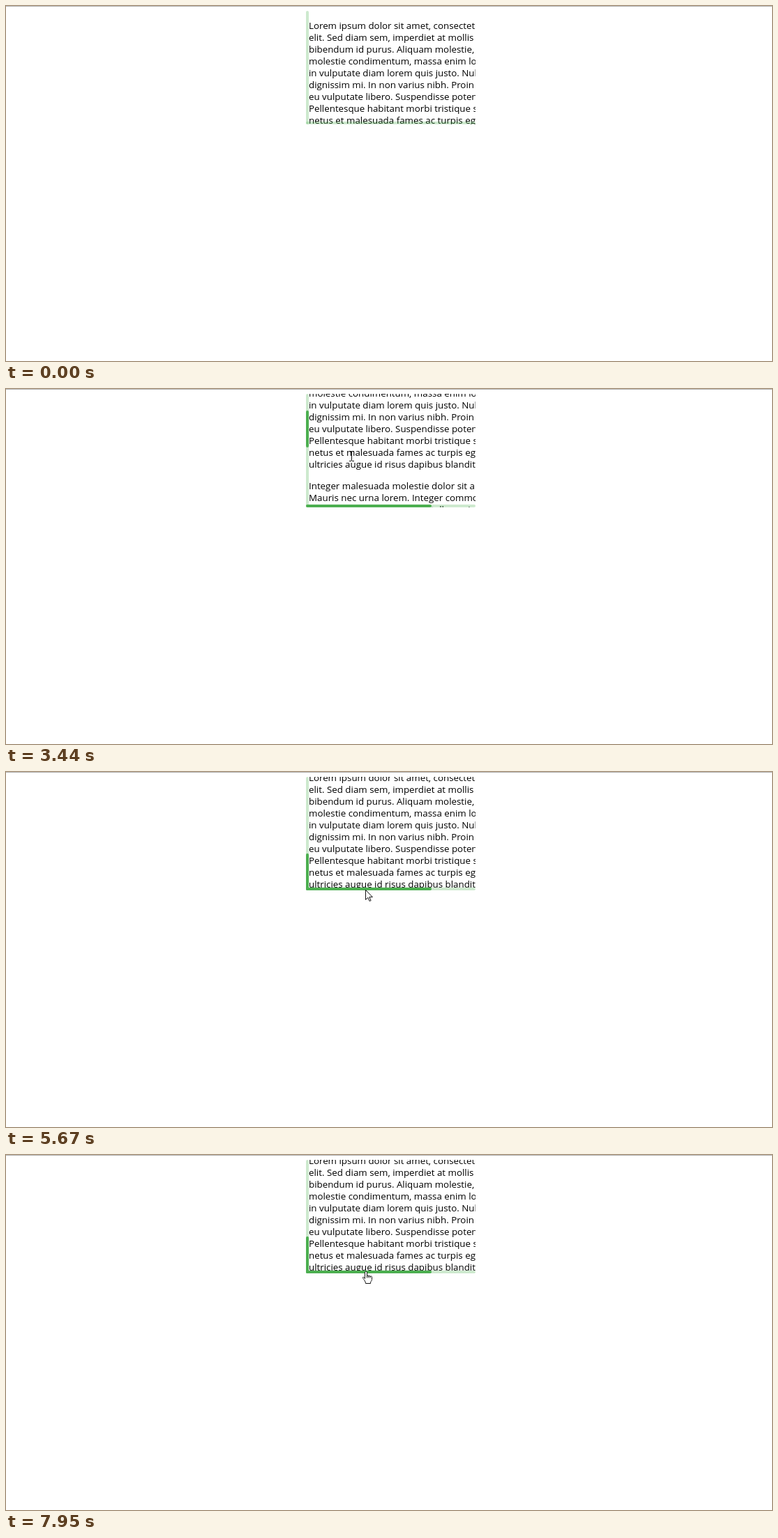
These frames come from a looping animation (1098x510 px, 8000 ms). An HTML page:

```html
<!DOCTYPE html>
<html lang="la">
<head>
<meta charset="utf-8">
<title>Scroll box</title>
<style>
@property --x { syntax: "<integer>"; inherits: true; initial-value: 0; }
@property --y { syntax: "<integer>"; inherits: true; initial-value: 0; }
@property --cx { syntax: "<integer>"; inherits: true; initial-value: 995; }
@property --cy { syntax: "<integer>"; inherits: true; initial-value: 527; }

html, body { margin: 0; width: 100%; height: 100%; overflow: hidden; background: #fff; }
.stage {
  position: relative; width: 1098px; height: 510px; overflow: hidden;
  box-sizing: border-box; border-top: 1px solid #b4b4b4;
  cursor: default;
}
.box {
  position: absolute; left: 430px; top: 6px; width: 243px; height: 163px; overflow: hidden;
  animation: scroll-y 8s infinite, scroll-x 8s infinite;
}
.text {
  position: absolute;
  left: calc(4px - var(--x) * 1px);
  top: calc(var(--y) * -1px);
  font: 13.333px/17px "Open Sans", "Noto Sans", sans-serif;
  color: #000; white-space: nowrap;
}
.text p { margin: 13.333px 0; }

.bar { position: absolute; left: 0; bottom: 0; border-radius: 2px; background: rgba(76, 175, 80, .28); }
.bar.v { width: 4px; height: 163px; }
.bar.h { width: 243px; height: 4px; }
.thumb {
  position: absolute; left: 0; top: 0; border-radius: 2px; background: #4caf50;
  animation: fade 8s linear infinite;
}
.v .thumb { width: 4px; height: 53px; transform: translateY(calc(var(--y) * 110px / 336)); }
.h .thumb { width: 180px; height: 4px; transform: translateX(calc(var(--x) * 63px / 85)); }

.mouse {
  position: absolute; left: 0; top: -1px;
  transform: translate(calc(var(--cx) * 1px), calc(var(--cy) * 1px));
  animation: mouse 8s infinite;
}
.mouse svg { position: absolute; overflow: visible; width: 20px; height: 20px; }
.mouse path { fill: #fff; stroke: #111; stroke-width: 1; stroke-linejoin: round; }
.mouse .thin { fill: none; }
.arrow { left: 0; top: 0; animation: arrow 8s step-end infinite; }
.beam { left: -3px; top: -8px; animation: beam 8s step-end infinite; }
.hand { left: -5px; top: 0; animation: hand 8s step-end infinite; }

/* jump-both: the first change falls on the start of a move, the last on its end */
@keyframes mouse {
  0% { --cx: 995; --cy: 527; animation-timing-function: step-end; }
  .875% { --cx: 995; --cy: 527; animation-timing-function: steps(11, jump-both); }
  10.5% { --cx: 455; --cy: 47; animation-timing-function: step-end; }
  19% { --cx: 455; --cy: 47; animation-timing-function: steps(2, jump-both); }
  21% { --cx: 442; --cy: 43; animation-timing-function: step-end; }
  24% { --cx: 442; --cy: 43; animation-timing-function: steps(8, jump-both); }
  32% { --cx: 489; --cy: 80; animation-timing-function: step-end; }
  35.875% { --cx: 489; --cy: 80; animation-timing-function: steps(3, jump-both); }
  39% { --cx: 495; --cy: 97; animation-timing-function: step-end; }
  49.625% { --cx: 495; --cy: 97; animation-timing-function: steps(5, jump-both); }
  56.375% { --cx: 495; --cy: 106; animation-timing-function: step-end; }
  58.25% { --cx: 495; --cy: 107; animation-timing-function: step-end; }
  60% { --cx: 495; --cy: 107; animation-timing-function: steps(3, jump-both); }
  62.875% { --cx: 511; --cy: 145; animation-timing-function: step-end; }
  65.125% { --cx: 511; --cy: 145; animation-timing-function: steps(6, jump-both); }
  70.875% { --cx: 515; --cy: 169; animation-timing-function: step-end; }
  75.875% { --cx: 515; --cy: 169; animation-timing-function: steps(2, jump-both); }
  78% { --cx: 517; --cy: 167; animation-timing-function: step-end; }
  80.75% { --cx: 517; --cy: 167; animation-timing-function: steps(4, jump-both); }
  84.75% { --cx: 521; --cy: 166; animation-timing-function: steps(5, end); }
  89.625% { --cx: 560; --cy: 167; animation-timing-function: step-end; }
  90.625% { --cx: 569; --cy: 167; animation-timing-function: step-end; }
  91.5% { --cx: 569; --cy: 167; animation-timing-function: steps(3, jump-both); }
  94.375% { --cx: 583; --cy: 167; animation-timing-function: step-end; }
  96.625% { --cx: 583; --cy: 167; animation-timing-function: steps(3, jump-both); }
  99.375%, 100% { --cx: 516; --cy: 167; animation-timing-function: step-end; }
}
@keyframes scroll-y {
  0% { --y: 0; animation-timing-function: step-end; }
  35.875% { --y: 0; animation-timing-function: steps(3, jump-both); }
  39% { --y: 49; animation-timing-function: step-end; }
  43% { --y: 49; animation-timing-function: steps(1, jump-both); }
  43.75% { --y: 97; animation-timing-function: step-end; }
  45.75% { --y: 97; animation-timing-function: steps(2, jump-both); }
  47.375% { --y: 146; animation-timing-function: step-end; }
  49.625% { --y: 146; animation-timing-function: steps(2, jump-both); }
  51.25% { --y: 243; animation-timing-function: step-end; }
  54.25% { --y: 243; animation-timing-function: steps(2, jump-both); }
  56.375%, 100% { --y: 336; animation-timing-function: step-end; }
}
@keyframes scroll-x {
  0% { --x: 0; animation-timing-function: step-end; }
  80.75% { --x: 0; animation-timing-function: steps(4, jump-both); }
  84.75% { --x: 5; animation-timing-function: steps(5, end); }
  89.625% { --x: 54; animation-timing-function: step-end; }
  90.625% { --x: 66; animation-timing-function: step-end; }
  91.5% { --x: 66; animation-timing-function: steps(3, jump-both); }
  94.375% { --x: 85; animation-timing-function: step-end; }
  96.625% { --x: 85; animation-timing-function: steps(3, jump-both); }
  99.375%, 100% { --x: 0; animation-timing-function: step-end; }
}
@keyframes fade {
  0%, 8.75% { opacity: 0; }
  17.125%, 71.875% { opacity: 1; }
  75% { opacity: .3; }
  78%, 100% { opacity: 1; }
}
@keyframes arrow {
  0%, 69% { opacity: 1; }
  7.875%, 75.875%, 100% { opacity: 0; }
}
@keyframes beam {
  0%, 69%, 85.875%, 100% { opacity: 0; }
  7.875%, 84.75% { opacity: 1; }
}
@keyframes hand {
  0%, 84.75% { opacity: 0; }
  75.875%, 85.875%, 100% { opacity: 1; }
}
</style>
</head>
<body>
<div class="stage">
  <div class="box">
    <div class="text">
      <p>Lorem ipsum dolor sit amet, consectetur adipiscing<br>
      elit. Sed diam sem, imperdiet at mollis vestibulum,<br>
      bibendum id purus. Aliquam molestie, leo sed<br>
      molestie condimentum, massa enim lobortis massa,<br>
      in vulputate diam lorem quis justo. Nullam nec<br>
      dignissim mi. In non varius nibh. Proin et eros nisi,<br>
      eu vulputate libero. Suspendisse potenti.<br>
      Pellentesque habitant morbi tristique senectus et<br>
      netus et malesuada fames ac turpis egestas. Duis<br>
      ultricies augue id risus dapibus blandit.</p>
      <p>Integer malesuada molestie dolor sit amet viverra.<br>
      Mauris nec urna lorem. Integer commodo aliquet<br>
      ligula eget fermentum. In in tellus a risus semper<br>
      pellentesque. Cras non faucibus est. Mauris eget<br>
      risus mollis nisl mollis ac mattis mi volutpat.<br>
      Vivamus ac rutrum elit. Suspendisse sed magna<br>
      vitae sapien sollicitudin mattis.</p>
      <p>Lorem ipsum dolor sit amet, consectetur adipiscing<br>
      elit. Sed diam sem, imperdiet at mollis vestibulum,<br>
      bibendum id purus. Aliquam molestie, leo sed<br>
      molestie condimentum, massa enim lobortis massa,<br>
      in vulputate diam lorem quis justo. Nullam nec<br>
      dignissim mi. In non varius nibh. Proin et eros nisi,<br>
      eu vulputate libero. Suspendisse potenti.<br>
      Pellentesque habitant morbi tristique senectus et<br>
      netus et malesuada fames ac turpis egestas. Duis<br>
      ultricies augue id risus dapibus blandit.</p>
    </div>
    <div class="bar v"><div class="thumb"></div></div>
    <div class="bar h"><div class="thumb"></div></div>
  </div>
  <div class="mouse">
    <svg class="arrow"><path d="M.5 .5v14l3.3-3.1 2.3 5.1 2-.9-2.3-4.9h4.6z"/></svg>
    <svg class="beam"><path class="thin" d="M0 .5h3M4 .5h3M3.5 1v13M0 14.5h3M4 14.5h3"/></svg>
    <svg class="hand">
      <path d="M5 .5c-.9 0-1.5.6-1.5 1.5v8.5L2.2 8.9C1.6 8.1.5 8.2.5 9.2c0 .8 1 1.8 2 3.4L4 15.1l.5 2.4h7l.2-1.9c.4-1.4 1.8-2 1.8-4.1v-3c0-1.8-2.2-2-2.4-.6 0-1.7-2-2-2.3-.5 0-1.6-2-1.7-2.3-.4V2C6.500 1.100 5.900.500 5 .500z"/>
      <path class="thin" d="M6.500 6.500v3M8.800 7v2.500M11.100 7.500v2"/>
    </svg>
  </div>
</div>
</body>
</html>
```
